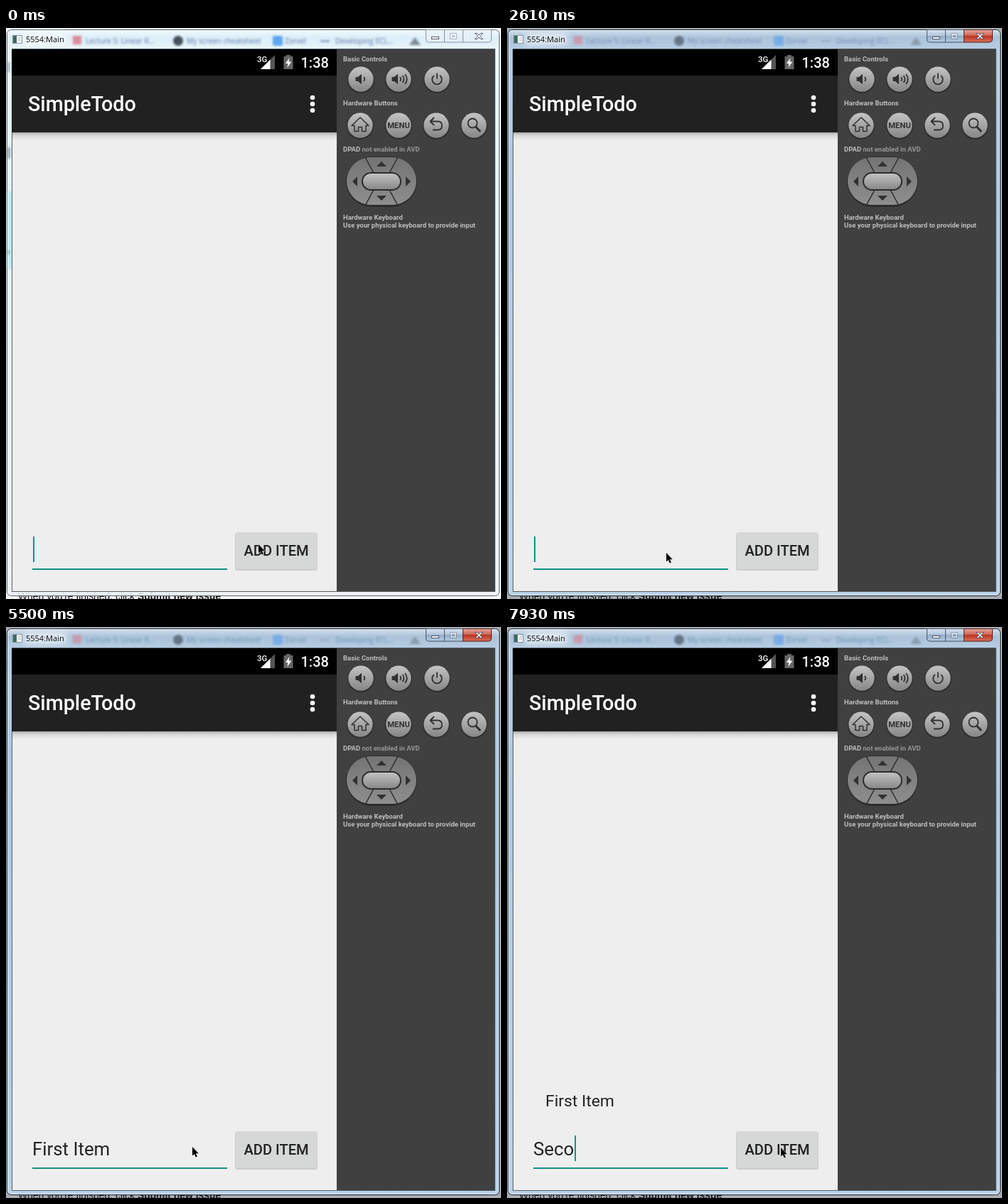
Animation of 696x804 px, one loop 8000 ms. Source, as an HTML page:

```html
<!DOCTYPE html>
<html lang="en">
<head>
<meta charset="utf-8">
<title>SimpleTodo</title>
<style>
html, body { margin: 0; width: 100%; height: 100%; overflow: hidden; background: #fff; }
#stage { position: relative; width: 696px; height: 804px; overflow: hidden; }
svg { position: absolute; left: 0; top: 0; display: block; }
text { font-family: Roboto, sans-serif; }
.med { font-weight: 500; }
.panel text { font-weight: 700; font-size: 9.5px; fill: #bdbdbd; }
.tabs text { font: 10.3px "Open Sans", sans-serif; fill: #3d5f96; }
#field {
  position: absolute; left: 37px; top: 716px; height: 36px;
  display: flex; align-items: flex-start;
  font: 25.8px Roboto, sans-serif; color: #222;
}
#typed { white-space: pre; line-height: 39.4px; }
#caret { width: 2px; height: 36px; margin-left: .5px; background: #009688; }
</style>
</head>
<body>
<div id="stage">
<svg width="696" height="804" viewBox="0 0 696 804">
  <defs>
    <linearGradient id="idle" x1="0" y1="0" x2="0" y2="1">
      <stop offset="0" stop-color="#f3fafd"/><stop offset=".014" stop-color="#d8edf8"/>
      <stop offset=".035" stop-color="#e8f5fb"/><stop offset=".3" stop-color="#e0f3fb"/>
      <stop offset="1" stop-color="#ecf2f8"/>
    </linearGradient>
    <linearGradient id="lit" x1="0" y1="0" x2="0" y2="1">
      <stop offset="0" stop-color="#d0dfee"/><stop offset=".014" stop-color="#a9c0d8"/>
      <stop offset=".035" stop-color="#b3cbe2"/><stop offset=".3" stop-color="#a9c6e2"/>
      <stop offset="1" stop-color="#b7d1ea"/>
    </linearGradient>
    <linearGradient id="drop" x1="0" y1="0" x2="0" y2="1">
      <stop offset="0" stop-color="#ababab"/><stop offset=".35" stop-color="#d6d6d6"/>
      <stop offset="1" stop-color="#eee"/>
    </linearGradient>
    <linearGradient id="metal" x1="0" y1="0" x2="0" y2="1">
      <stop offset="0" stop-color="#c4c4c4"/><stop offset="1" stop-color="#868686"/>
    </linearGradient>
    <linearGradient id="pad" x1="0" y1="0" x2="0" y2="1">
      <stop offset="0" stop-color="#747474"/><stop offset="1" stop-color="#8e8e8e"/>
    </linearGradient>
    <linearGradient id="red" x1="0" y1="0" x2="0" y2="1">
      <stop offset="0" stop-color="#e4a79c"/><stop offset=".45" stop-color="#d0675a"/>
      <stop offset=".5" stop-color="#bb3322"/><stop offset="1" stop-color="#d9705a"/>
    </linearGradient>
    <linearGradient id="blue" x1="0" y1="0" x2="0" y2="1">
      <stop offset="0" stop-color="#d6e2ef"/><stop offset=".45" stop-color="#b4c8dd"/>
      <stop offset=".5" stop-color="#93abc6"/><stop offset="1" stop-color="#b4cce3"/>
    </linearGradient>
    <filter id="soft" x="-20%" y="-50%" width="140%" height="200%"><feGaussianBlur stdDeviation="1.6"/></filter>
    <filter id="glow" x="-50%" y="-100%" width="200%" height="300%"><feGaussianBlur stdDeviation="5"/></filter>
  </defs>

  <!-- page behind the window -->
  <rect width="696" height="804" fill="#f2f6f9"/>
  <text x="17" y="805" font-size="13.9" fill="#111" style="font-family:'Liberation Sans',sans-serif">When you're finished, click <tspan font-weight="700">Submit new issue</tspan></text>
  <rect id="shade" width="696" height="804" fill="#1c2733" opacity="0"/>

  <!-- window glass -->
  <rect x="1.5" y="2.5" width="692" height="797" rx="6" fill="url(#idle)" fill-opacity=".88" stroke="#555d66"/>
  <g filter="url(#soft)">
    <rect x="3" y="230" width="5" height="110" fill="#b8eaf8"/>
    <path d="M1 48h4v14h-4zM1 168h5v16h-5zM2 313h3v6h-3z" fill="#567" opacity=".55"/>
  </g>
  <rect id="active" x="1.5" y="2.5" width="692" height="797" rx="6" fill="url(#lit)" fill-opacity=".93" stroke="#20262d" opacity="0"/>
  <rect x="2.5" y="3.5" width="690" height="795" rx="5" fill="none" stroke="#fff" stroke-opacity=".6"/>
  <g id="tabs" class="tabs" filter="url(#soft)">
    <rect x="94" y="11" width="12" height="12" fill="#dc7c8a"/>
    <text x="112" y="21.5">Lecture 5: Linear R...</text>
    <circle cx="242" cy="18" r="7" fill="#2b3440"/>
    <text x="254" y="21.5">My screen cheatsheet</text>
    <rect x="375" y="11" width="14" height="14" rx="2" fill="#4d9af0"/>
    <text x="392" y="21.5">Zorvel</text>
    <rect x="442" y="17" width="13" height="3" fill="#8a9cc0"/>
    <text x="463" y="21.5">Developing ECL...</text>
    <path d="M567 24l8-11 8 11z" fill="#6d7986"/>
  </g>
  <rect x="24" y="9" width="62" height="14" rx="7" fill="#fff" opacity=".75" filter="url(#glow)"/>
  <rect x="9.5" y="10.5" width="13" height="11" fill="#fff" stroke="#88939d"/>
  <rect x="10" y="11" width="5" height="10" fill="#3d6b62"/>
  <path d="M17 14h4M17 17h4" stroke="#9aa6b0"/>
  <text x="28" y="20" font-size="11" fill="#000" style="font-family:'Open Sans',sans-serif">5554:Main</text>

  <!-- caption buttons -->
  <g fill="#e8f1f8" stroke="#8793a0">
    <path d="M590.5 2.500v13.500q0 4 4 4h84q4 0 4-4v-13.500z" fill-opacity=".6"/>
    <path d="M616.500 3v17M642.500 3v17" fill="none"/>
  </g>
  <g id="caption" opacity="0" stroke="#4b5a6b">
    <path d="M590.5 2.500v13.500q0 4 4 4h22v-17.500z" fill="url(#blue)"/>
    <path d="M616.500 2.500h26v17.500h-26z" fill="url(#blue)"/>
    <path d="M642.500 2.500v17.500h36q4 0 4-4v-13.500z" fill="url(#red)" stroke="#5b2019"/>
  </g>
  <g fill="#fff" stroke="#535666">
    <rect x="598.500" y="12.500" width="10" height="3"/>
    <path d="M624.500 7.500h9v8h-9zM627.500 10.500v2h3v-2z" fill-rule="evenodd" opacity=".4"/>
    <path d="M659.500 7.500h3l2.500 2.500 2.500-2.500h3l-4 4 4 4h-3l-2.500-2.500-2.500 2.500h-3l4-4z"/>
  </g>

  <!-- device screen -->
  <rect x="8" y="29" width="680" height="765" fill="#555d64"/>
  <rect x="9" y="30" width="457" height="763" fill="#eee"/>
  <rect x="9" y="147" width="457" height="11" fill="url(#drop)"/>
  <rect x="8" y="30" width="458" height="37" fill="#000"/>
  <rect x="8" y="67" width="458" height="80" fill="#212121"/>
  <g fill="#fff">
    <path d="M378 38v20h-20z" fill="#555"/>
    <path d="M371.500 44.500v13.500h-13.500z"/>
    <text x="353" y="48" font-size="11.500" class="med" stroke="#000" stroke-width="2" paint-order="stroke">3G</text>
    <path d="M390.500 40h3.500v-2h6v2h3.500v18h-13z" fill="#666"/>
    <path d="M398.500 42l-5.500 8h3.500l-1 6 5.800-8.500h-3.800z"/>
    <text x="414.500" y="56" font-size="20" class="med">1:38</text>
    <text x="31" y="117" font-size="28.700" class="med">SimpleTodo</text>
    <circle cx="431" cy="98" r="3.300"/><circle cx="431" cy="107" r="3.300"/><circle cx="431" cy="116" r="3.300"/>
  </g>
  <text id="item" x="54" y="675" font-size="22.900" fill="#222">First Item</text>
  <rect x="37" y="761" width="274" height="2" fill="#139084"/>
  <rect id="btnShadow" x="322" y="711" width="116" height="53" rx="3" fill="#000" opacity=".14"/>
  <rect id="btn" x="323" y="710" width="114" height="52" rx="2.500"/>
  <text x="380" y="743" font-size="20.100" class="med" text-anchor="middle" fill="#212121">ADD ITEM</text>

  <!-- emulator controls -->
  <rect x="465" y="30" width="222" height="763" fill="#404040"/>
  <g class="panel">
    <text x="474" y="47">Basic Controls</text>
    <text x="474" y="109">Hardware Buttons</text>
    <text x="474" y="174">DPAD <tspan fill="#969696">not enabled in AVD</tspan></text>
    <text x="474" y="270">Hardware Keyboard</text>
    <text x="474" y="281">Use your physical keyboard to provide input</text>
  </g>
  <g id="knobs"></g>
  <g fill="none" stroke="#303030" stroke-width="1.800" stroke-linejoin="round">
    <g id="speaker"><path d="M492 69.500h3l4.500-4v13l-4.500-4h-3z" fill="#303030" stroke-width="1"/><path d="M503 69q2.500 3 0 6"/></g>
    <use href="#speaker" x="51"/>
    <path d="M557.500 67q4 5 0 10M561 65q5.500 7 0 14"/>
    <path d="M602 67a6.800 6.800 0 1 0 8 0M606 63.500v8"/>
    <path d="M486 137.500l12-11.500 12 11.500h-4v8h-5.500v-6h-5v6h-5.500v-8z" stroke-width="1.500"/>
    <path d="M602 126l-5.500 5.500 5.500 5.500M597 131.500h10q6 0 6 6t-6 6h-7"/>
    <circle cx="656" cy="134" r="6.500"/><path d="M660.500 139l6.500 7" stroke-width="3"/>
  </g>
  <text x="552" y="141" text-anchor="middle" font-size="11.300" font-weight="700" fill="#303030">MENU</text>
  <rect x="478" y="181" width="100" height="71" rx="36" fill="#2c2c2c"/>
  <rect x="479" y="182" width="98" height="67" rx="34" fill="url(#pad)"/>
  <path d="M505 182l13 24M551 182l-13 24M505 250l13-24M551 250l-13-24" stroke="#2c2c2c" stroke-width="1.500"/>
  <rect x="501" y="204" width="54" height="24" rx="12" fill="url(#metal)" stroke="#2c2c2c" stroke-width="2"/>
  <path d="M521 195l7-7 7 7zM521 236l7 7 7-7zM494 209v14l-7-7zM562 209v14l7-7z" fill="#303030"/>
</svg>
<div id="field"><span id="typed"></span><i id="caret"></i></div>
<svg width="696" height="804" viewBox="0 0 696 804">
  <path id="mouse" d="M0 0V12.500L2.800 10 4.800 14.600 6.900 13.700 4.900 9.200H8.800Z" fill="#000" stroke="#fff" stroke-width=".8" paint-order="stroke"/>
</svg>
</div>
<script>
const LOOP = 8000;
const $ = id => document.getElementById(id);

$("knobs").innerHTML = [[499, 72], [552, 72], [606, 72], [498, 137], [552, 137], [605, 137], [658, 137]]
  .map(([x, y]) => `<circle cx="${x}" cy="${y + 1}" r="19" fill="#2e2e2e"/>
    <circle cx="${x}" cy="${y}" r="17.5" fill="url(#metal)" stroke="#d0d0d0" stroke-opacity=".2"/>`).join("");

// each track holds [start time, value], held until the next entry
const text = [[0, ""], [6400, ""]];
const type = (word, base, times) =>
  times.forEach((t, i) => text.push([t, base + word.slice(0, i + 1)]));
type("First ", "", [3010, 3154, 3298, 3442, 3586, 3730]);
type("Item", "First ", [4410, 4720, 4870, 5020]);
type("Seco", "", [7260, 7450, 7640, 7930]);
text.sort((a, b) => a[0] - b[0]);

const caret = [[0, 1], [130, 0], [640, 1], [1070, 0], [1500, 1], [2100, 0], [2610, 1],
  [4290, 0], [4410, 1], [5500, 0], [5940, 1], [6850, 0], [7260, 1]];
const mouse = [[0, "355,727"], [1500, "311,731"], [1650, "250,737"], [1800, "224,739"],
  [5500, "262,732"], [5640, "310,733"], [5790, "360,733"], [5940, "385,733"]];
const button = [[0, "#d6d7d7"], [6250, "#cfd0d0"], [6400, "#cbcccc"], [6550, "#cccdcd"], [6850, "#d6d7d7"]];

const at = (track, t) => track.findLast(([start]) => start <= t)[1];

function draw(t) {
  const focus = Math.min(1, Math.max(0, (t - 1900) / 400));
  $("active").setAttribute("opacity", focus);
  $("caption").setAttribute("opacity", focus);
  $("shade").setAttribute("opacity", .35 * focus);
  $("tabs").setAttribute("opacity", .85 - .3 * focus);
  $("typed").textContent = at(text, t);
  $("caret").style.opacity = at(caret, t);
  $("mouse").setAttribute("transform", `translate(${at(mouse, t)})`);
  $("btn").setAttribute("fill", at(button, t));
  $("btnShadow").setAttribute("opacity", t >= 6250 && t < 6850 ? .22 : .14);
  $("item").setAttribute("opacity", t >= 6400 ? 1 : 0);
}

const start = performance.now();
function tick() {
  draw((performance.now() - start) % LOOP);
  requestAnimationFrame(tick);
}
tick();
</script>
</body>
</html>
```
